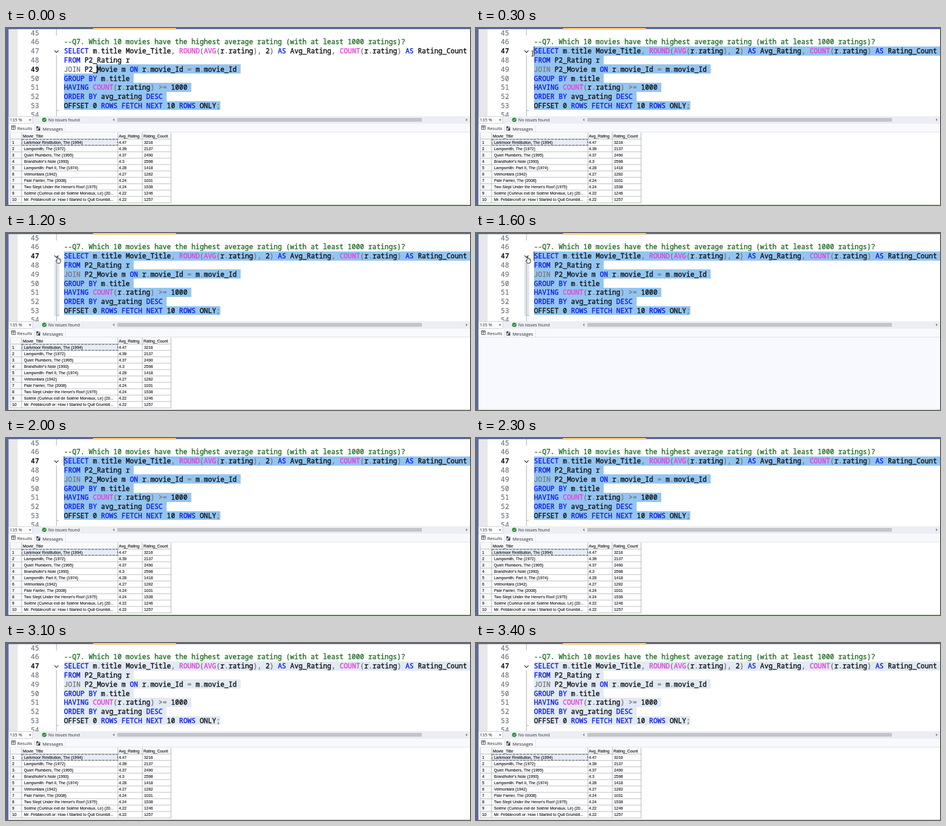
These frames come from a looping animation (800 px wide and 307 px high, 3.5 s). An HTML page with a canvas:

```html
<!DOCTYPE html>
<html lang="en">
<head>
<meta charset="utf-8">
<title>Query window</title>
<style>
html, body { margin: 0; width: 100%; height: 100%; overflow: hidden; background: #fff; }
canvas { display: block; width: 800px; height: 307px; }
</style>
</head>
<body>
<canvas id="stage" width="800" height="307"></canvas>
<script>
const ctx = document.getElementById('stage').getContext('2d');
const LOOP = 3500;
const MONO = '"Noto Sans Mono", "DejaVu Sans Mono", monospace';
const UI = '"Open Sans", "Noto Sans", sans-serif';
const GRID = '"Liberation Sans", Arial, sans-serif';
const LEFT = 100, CHAR = 7.092, TOP = 32.3, PITCH = 15.8, FIRST = 47;

const COMMENT = '--Q7. Which 10 movies have the highest average rating (with at least 1000 ratings)?';
const CODE = [
  'SELECT m.title Movie_Title, ROUND(AVG(r.rating), 2) AS Avg_Rating, COUNT(r.rating) AS Rating_Count',
  'FROM P2_Rating r',
  'JOIN P2_Movie m ON r.movie_Id = m.movie_Id',
  'GROUP BY m.title',
  'HAVING COUNT(r.rating) >= 1000',
  'ORDER BY avg_rating DESC',
  'OFFSET 0 ROWS FETCH NEXT 10 ROWS ONLY;'
];
const KEYWORD = /^(SELECT|AS|FROM|ON|GROUP|BY|HAVING|ORDER|DESC|ROWS|FETCH|NEXT)$/;
const FUNC = /^(ROUND|AVG|COUNT)$/;

const ROWS = [
  ['Larkmoor Restitution, The (1994)', '4.47', '3216'],
  ['Lampsmith, The (1972)', '4.39', '2137'],
  ['Quiet Plumbers, The (1995)', '4.37', '2490'],
  ["Brandhofer's Note (1993)", '4.3', '2598'],
  ['Lampsmith: Part II, The (1974)', '4.28', '1418'],
  ['Velmontara (1942)', '4.27', '1282'],
  ['Pale Farrier, The (2008)', '4.24', '1031'],
  ["Two Slept Under the Heron's Roof (1975)", '4.24', '1538'],
  ['Solène (Curieux exil de Solène Morvaux, Le) (20...', '4.22', '1246'],
  ['Mr. Pebblecroft or: How I Started to Quit Grumbli...', '4.22', '1257']
];

function box(x, y, w, h, color) {
  ctx.fillStyle = color;
  ctx.fillRect(x, y, w, h);
}

// A weight above zero thickens the letters by a thin outline.
function label(str, x, y, font, color, { align = 'left', weight = 0 } = {}) {
  ctx.font = font;
  ctx.textAlign = align;
  ctx.fillStyle = color;
  ctx.fillText(str, x, y);
  if (!weight) return;
  ctx.strokeStyle = color;
  ctx.lineWidth = weight;
  ctx.lineJoin = 'round';
  ctx.strokeText(str, x, y);
}

function shape(points, fill, stroke, width = 1, close = true) {
  ctx.beginPath();
  points.forEach(([x, y], i) => i ? ctx.lineTo(x, y) : ctx.moveTo(x, y));
  if (close) ctx.closePath();
  if (fill) { ctx.fillStyle = fill; ctx.fill(); }
  if (stroke) { ctx.strokeStyle = stroke; ctx.lineWidth = width; ctx.stroke(); }
}

const lineTop = i => Math.floor(TOP + i * PITCH);
const baseline = i => TOP + i * PITCH + 11.9;
const clamp = (v, a, b) => Math.min(b, Math.max(a, v));

function codeText(str, x, i, color) {
  label(str, x, baseline(i), `11.82px ${MONO}`, color, { weight: 0.4 });
}

function tokenColor(word) {
  if (KEYWORD.test(word)) return '#1020e8';
  if (FUNC.test(word)) return '#e63fdc';
  if (word === 'JOIN' || /^[^\w]+$/.test(word)) return '#77797c';
  return '#101418';
}

function codeLine(str, i) {
  for (const m of str.matchAll(/\w+|[^\w\s]+/g)) {
    codeText(m[0], LEFT + m.index * CHAR, i, tokenColor(m[0]));
  }
}

// Mouse drag up to the start of the query, then a rest over the fold mark.
function mouseAt(t) {
  const p = 1 - clamp(t / 450, 0, 1);
  const q = clamp((t - 650) / 250, 0, 1);
  const e = 1 - p * p;
  return { x: 157 - 67 * e, y: 72 - 31 * e + 4 * q, hand: t >= 800 };
}

function caretAt(mouse) {
  const line = clamp(Math.floor((mouse.y - TOP) / PITCH), 0, 6);
  const col = clamp(Math.round((mouse.x - LEFT) / CHAR), 0, CODE[line].length);
  return { line, col };
}

function drawEditor(t, mouse) {
  const caret = caretAt(mouse);
  const focused = t < 3100;
  ctx.save();
  ctx.beginPath();
  ctx.rect(0, 0, 800, 153);
  ctx.clip();
  box(5, 2, 15, 151, '#e7e8ea');

  for (let i = caret.line; i < CODE.length; i++) {
    const x = LEFT + (i === caret.line ? caret.col * CHAR : 0);
    const end = LEFT + (CODE[i].length + (i < 6 ? 0.95 : 0)) * CHAR;
    box(x, lineTop(i), end - x, lineTop(i + 1) - lineTop(i), focused ? '#94c5f0' : '#e2eaf3');
  }

  if (mouse.hand && t < 1900) box(83, 48, 9, 96, '#e3e9ee');
  box(86.5, 2, 1, 11, '#a6a9ad');
  box(86.5, 47, 1, 106, '#a6a9ad');
  box(87, 142.5, 4, 1, '#a6a9ad');
  shape([[83.5, 39], [87, 42.5], [90.5, 39]], null, '#33383d', 1.1, false);

  for (let n = 45; n <= 54; n++) {
    const here = n - FIRST === caret.line;
    label(n, 57, baseline(n - FIRST), `${here ? 700 : 400} 11.82px ${MONO}`,
      here ? '#16191c' : '#747a80', { align: 'right', weight: here ? 0 : 0.25 });
  }
  codeText(COMMENT, LEFT, -1, '#24702a');
  CODE.forEach(codeLine);

  const blink = t < 480 || (t - 480) % 1060 < 530;
  if (focused && blink) box(LEFT + caret.col * CHAR - 0.5, lineTop(caret.line), 1.2, 16, '#15202c');
  ctx.restore();
}

function drawBars() {
  box(0, 0, 800, 2, '#5d6b9b');
  box(150, 0, 143, 3, '#f6cb87');
  box(0, 0, 4.5, 307, '#5d6b9b');

  box(4.5, 153, 795.5, 13, '#eceef4');
  box(5, 153.5, 41, 12, '#fbfbfd');
  ctx.strokeStyle = '#c9ccd6';
  ctx.lineWidth = 0.8;
  ctx.strokeRect(5, 153.5, 41, 12);
  label('135 %', 6.5, 162.3, `7.6px ${UI}`, '#24272c');
  shape([[39.5, 158.5], [43.5, 158.5], [41.5, 161]], '#44484f');

  ctx.beginPath();
  ctx.arc(66, 159.3, 3.8, 0, 7);
  ctx.fillStyle = '#2f8a3c';
  ctx.fill();
  shape([[64, 159.4], [65.5, 160.9], [68, 157.8]], null, '#fff', 0.9, false);
  label('No issues found', 73, 162, `7.2px ${UI}`, '#24272c');

  shape([[187, 156.7], [187, 161.7], [184, 159.2]], '#85888f');
  shape([[793, 156.7], [793, 161.7], [796, 159.2]], '#85888f');
  box(192, 156, 525, 6.5, '#c2c4ca');
}

function drawTabs() {
  box(4.5, 166, 795.5, 15, '#f8f9fd');
  box(5, 166.5, 44, 14.5, '#fff');
  box(49, 167, 0.8, 14, '#cfd3dc');
  box(102, 167, 0.8, 14, '#dfe2e9');
  box(4.5, 180.3, 795.5, 0.8, '#d5d8e0');

  ctx.strokeStyle = '#3c4148';
  ctx.lineWidth = 0.9;
  ctx.strokeRect(9.5, 169.5, 6.5, 6.5);
  box(9.5, 171.3, 6.5, 0.9, '#3c4148');
  box(12.3, 169.5, 0.8, 6.5, '#3c4148');
  label('Results', 19.5, 176.8, `7.7px ${UI}`, '#202327');

  ctx.strokeRect(53, 172, 5.5, 5.5);
  box(52.5, 170.5, 3, 3, '#3c4148');
  box(55.5, 174, 3.3, 3.5, '#3c4148');
  label('Messages', 63, 177.8, `7.8px ${UI}`, '#202327');
}

function drawGrid() {
  const font = `6.9px ${GRID}`;
  const step = 11.05, y0 = 192.7;
  const cell = (str, x, y) => label(str, x, y, font, '#16191c', { weight: 0.15 });
  box(4.5, 181, 795.5, 126, '#fff');
  box(7, 181.5, 278, 11, '#f8f9fa');
  box(7, y0, 20, step * 10, '#f8f9fa');
  box(27, y0, 166, step, '#e6ecf5');

  for (let i = 0; i <= 10; i++) box(7, y0 + i * step - 0.4, 278, 0.8, '#a9acb1');
  for (const x of [7, 27, 193, 235, 284.5]) box(x - 0.4, 181.5, 0.8, 11.2 + step * 10, '#a5a8ad');

  ctx.strokeStyle = '#3f4753';
  ctx.lineWidth = 0.9;
  ctx.setLineDash([4, 2]);
  ctx.strokeRect(27.5, y0 + 0.4, 165, step - 0.8);
  ctx.setLineDash([]);

  cell('Movie_Title', 29, 190);
  cell('Avg_Rating', 194.5, 190);
  cell('Rating_Count', 237, 190);
  ROWS.forEach(([title, avg, count], i) => {
    const y = 200.6 + i * step;
    cell(i + 1, 10.5, y);
    cell(title, 31, y);
    cell(avg, 194.5, y);
    cell(count, 238, y);
  });
}

function drawMouse({ x, y, hand }) {
  if (!hand) {
    box(x - 0.5, y - 4.5, 1, 9, '#20242a');
    box(x - 2, y - 5, 4, 0.9, '#20242a');
    box(x - 2, y + 4, 4, 0.9, '#20242a');
    return;
  }
  ctx.save();
  ctx.translate(x, y);
  ctx.lineJoin = 'round';
  shape([[-2, -4.5], [-0.7, -4.5], [-0.3, -0.8], [1.2, -0.9], [2.7, -0.3], [4, 0.5],
    [4.2, 4], [3, 7.3], [-1.4, 7.3], [-4, 3], [-3.4, 1.8], [-2, 3]], '#fff', '#15181c', 0.9);
  shape([[1.2, 0], [1.2, 2]], null, '#15181c', 0.5, false);
  shape([[2.7, 0.5], [2.7, 2.3]], null, '#15181c', 0.5, false);
  ctx.restore();
}

function draw(t) {
  const mouse = mouseAt(t);
  box(0, 0, 800, 307, '#fff');
  drawEditor(t, mouse);
  drawBars();
  drawTabs();
  if (t >= 1400 && t < 1900) box(4.5, 181, 795.5, 126, '#f8f9fe');
  else drawGrid();
  box(4.5, 305.6, 795.5, 1.4, '#cfe3c4');
  if (t < 1900) drawMouse(mouse);
}

const start = performance.now();
function tick() {
  const t = (performance.now() - start) % LOOP;
  draw(Math.floor(t / 100) * 100);
  requestAnimationFrame(tick);
}
tick();
</script>
</body>
</html>
```
